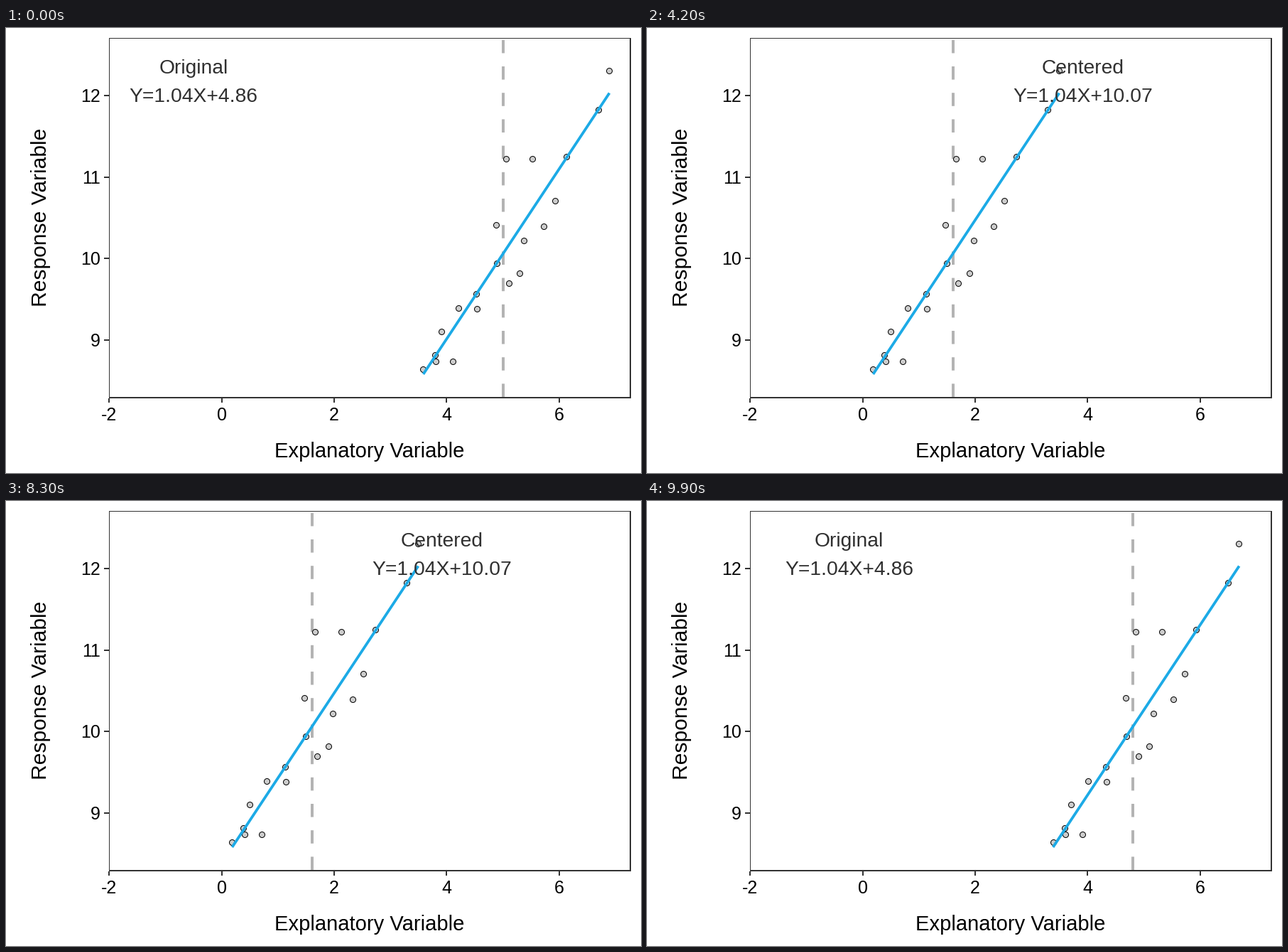
Recreate the animation shown at these times as a matplotlib script. Size 894x626 px, loop 10 s.

```python
import numpy as np
import matplotlib.pyplot as plt
from matplotlib.animation import FuncAnimation
from matplotlib.patches import Rectangle

W, H, DPI = 894, 626, 100
FRAMES, INTERVAL = 100, 100
STEPS = 25                      # frames for one slide of five units
X0, X_UNIT = 303.7, 79.15       # pixel of x = 0, pixels per unit
Y12, Y_UNIT = 95.5, 114.4       # pixel of y = 12, pixels per unit
LEFT, TOP, RIGHT, BOTTOM = 145, 14, 880, 521
GREY, LABEL = "#333333", "#303030"

plt.rcParams["font.family"] = "Liberation Sans"


def pt(px):
    return px * 72 / DPI


def x_px(x):
    return X0 + X_UNIT * x


def y_px(y):
    return Y12 + Y_UNIT * (12 - y)


fig = plt.figure(figsize=(W / DPI, H / DPI), dpi=DPI, facecolor="white")
ax = fig.add_axes([0, 0, 1, 1])
ax.set_xlim(0, W)
ax.set_ylim(H, 0)
ax.axis("off")


def bar(x, y, w, h):
    ax.add_patch(Rectangle((x, y), w, h, fc=GREY, lw=0, aa=False, zorder=1))


def write(x, y, s, size, color="black", ha="center", **kw):
    return ax.text(x, y, s, fontsize=pt(size), color=color, ha=ha,
                   va="baseline", zorder=6, **kw)


# Panel border, ticks and axis text
bar(LEFT, TOP, 1, BOTTOM - TOP)
bar(LEFT, TOP, RIGHT - LEFT, 1)
bar(RIGHT - 2, TOP, 2, BOTTOM - TOP)
bar(LEFT, BOTTOM - 2, RIGHT - LEFT, 2)
for v in (-2, 0, 2, 4, 6):
    x = round(x_px(v))
    bar(x - 1, BOTTOM, 2, 6)
    write(x, 552.5, str(v), 25)
for v in (9, 10, 11, 12):
    y = round(y_px(v) - 0.1)
    bar(LEFT - 7, y - 1, 7, 2)
    write(133, y + 9, str(v), 25, ha="right")
write(511.8, 604.5, "Explanatory Variable", 29.17)
write(57.5, 266, "Response Variable", 30, rotation=90, rotation_mode="anchor")

# Scatter in pixels, before any shift
px = np.array([849.2, 833.5, 788.7, 703.8, 740.8, 772.5, 757.1, 689.6, 729.1, 691.3,
               723.3, 707.6, 661.7, 663.3, 636.5, 612.6, 603.5, 604.7, 628.8, 587.4])
py = np.array([60, 115, 181, 184, 184, 243, 279, 277, 299, 331,
               345, 359, 374, 395, 394, 427, 460, 469, 469, 480])
fit_x, fit_y = np.array([587.5, 849.5]), [487, 91.5]

DASH, DASH_W = 18.6, 4
mean_line, = ax.plot([], [], color="#b3b3b3", lw=pt(DASH_W), zorder=2,
                     dashes=(DASH / DASH_W, DASH / DASH_W),
                     dash_capstyle="butt")
dots, = ax.plot([], [], "o", ms=pt(8), mfc="#cccccc", mec="black",
                mew=pt(1), zorder=3)
fit, = ax.plot([], [], color="#1caae6", lw=pt(3.8), zorder=4,
               solid_capstyle="butt")
title = write(0, 63.5, "", 28.2, LABEL)
formula = write(0, 103.5, "", 28.2, LABEL)


def step_at(i):
    if i < 75:
        return min(max(i - 25, 0), STEPS)
    return STEPS - (i - 75)


def draw(i):
    k = step_at(i)
    shift = X_UNIT * 5 * k / STEPS
    mid = x_px(5) - shift + 0.5
    mean_line.set_data([mid, mid], [519, 17])
    dots.set_data(px - shift, py)
    fit.set_data(fit_x - shift, fit_y)

    centered = k > STEPS / 2
    title.set_text("Centered" if centered else "Original")
    formula.set_text("Y=1.04X+10.07" if centered else "Y=1.04X+4.86")
    for t in (title, formula):
        t.set_x(x_px(-0.5 + 6.5 * k / STEPS))
    return mean_line, dots, fit, title, formula


anim = FuncAnimation(fig, draw, frames=FRAMES, interval=INTERVAL,
                     repeat=True, repeat_delay=0, blit=False)
plt.show()
```
